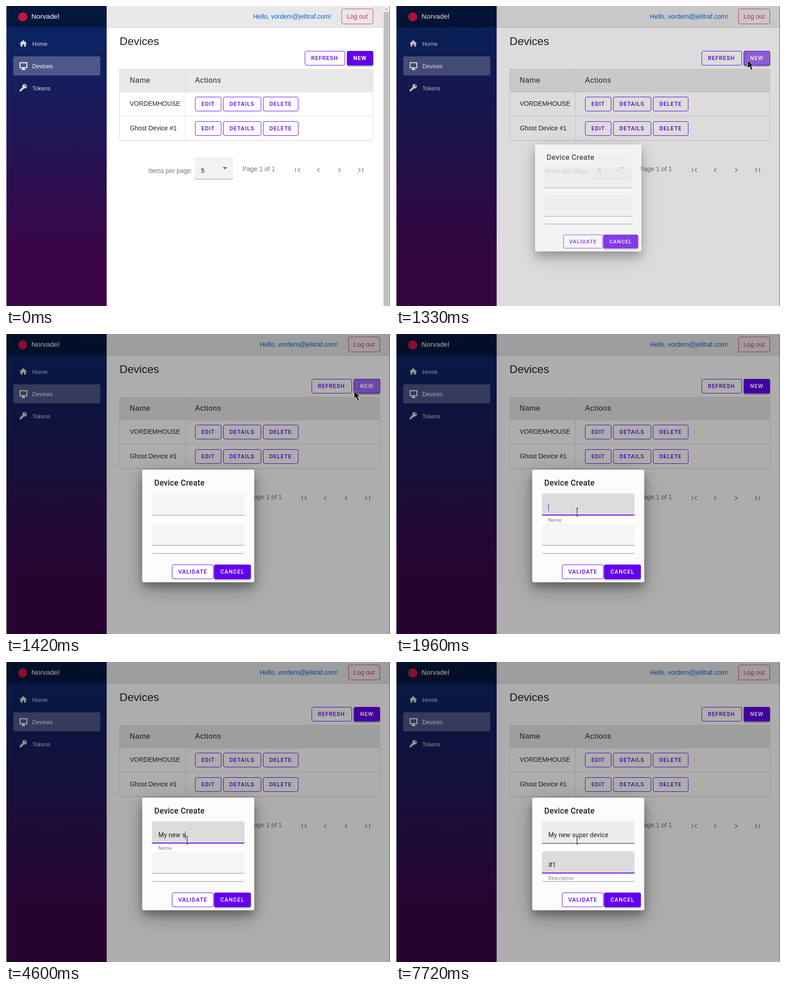
Write an HTML page that moves like this. It is 847x661 px and loops after 8000 ms.

```html
<!DOCTYPE html>
<html lang="en">
<head>
<meta charset="utf-8">
<title>Device Create</title>
<style>
  html, body { margin: 0; width: 100%; height: 100%; overflow: hidden; background: #fff; }
  svg { display: block; }
  text { font-family: "Liberation Sans", Arial, sans-serif; font-size: 14px; white-space: pre; }
  .nav { font-size: 12.6px; fill: #d7d7d7; }
  .th { font-size: 16px; letter-spacing: .75px; }
  .btn { font: 500 12.25px Roboto, sans-serif; letter-spacing: 1.09px; }
  .title { font: 500 17.5px Roboto, sans-serif; letter-spacing: .22px; }
  .input { font: 14px Roboto, sans-serif; letter-spacing: .13px; }
  .helper { font: 10.5px Roboto, sans-serif; letter-spacing: .35px; }
  .raised { filter: drop-shadow(0 2px 1.5px #0006); }
  #panel { filter: drop-shadow(0 11px 9px #0004) drop-shadow(0 12px 20px #0004); }
</style>
</head>
<body>
<svg id="stage" width="847" height="661" viewBox="0 0 847 661"></svg>
<script>
const PURPLE = '#6200ee', DARK = '#212121', GREY = '#747474';
const LOOP = 8000, STEP = 30;

const text = (x, y, label, fill = DARK, cls = '', attrs = '') =>
  `<text x="${x}" y="${y}" fill="${fill}" class="${cls}" ${attrs}>${label}</text>`;
const rect = (x, y, w, h, fill, attrs = '') =>
  `<rect x="${x}" y="${y}" width="${w}" height="${h}" fill="${fill}" ${attrs}/>`;
const path = (d, fill, attrs = '') => `<path d="${d}" fill="${fill}" ${attrs}/>`;
const line = (d, color, width = 1) => path(d, 'none', `stroke="${color}" stroke-width="${width}"`);

function button(x, y, w, label, raised) {
  const box = raised
    ? rect(x, y, w, 32, PURPLE, 'rx="3.5" class="raised"')
    : rect(x + .5, y + .5, w - 1, 31, '#fff', `rx="3.5" stroke="${PURPLE}"`);
  return box + text(x + 14, y + 20, label, raised ? '#fff' : PURPLE, 'btn');
}

const rowButtons = y =>
  button(417, y, 58, 'EDIT') + button(479, y, 84, 'DETAILS') + button(567, y, 78, 'DELETE');

// A text field with its hover/focus shade, underlines, value and helper text.
const field = (id, y, helper) => `<g id="${id}">
  ${path(`M322 ${y + 49}V${y + 4}q0-4 4-4H522q4 0 4 4V${y + 49}Z`, '#f5f5f5')}
  ${path(`M322 ${y + 49}V${y + 4}q0-4 4-4H522q4 0 4 4V${y + 49}Z`, '#000', 'class="shade"')}
  ${rect(322, y + 48, 204, 1, '#000', 'class="line"')}
  ${rect(322, y + 47, 204, 2, PURPLE, 'class="focus"')}
  ${text(336, y + 35, '', DARK, 'input')}
  ${text(336, y + 63, helper, GREY, 'helper')}</g>`;

const sidebar = `
  ${rect(1, 0, 221, 661, 'url(#night)')}
  ${rect(1, 0, 221, 47, '#000', 'opacity=".4"')}
  <circle cx="37" cy="24" r="10" fill="#c81440"/>
  ${text(56, 28, 'Norvadel', '#fff', '', 'style="font-size:15.4px"')}
  ${rect(16, 111, 192, 42, '#fff', 'rx="3.5" opacity=".25"')}
  ${path('M38 75l8.5 8H44v6.5h-4V85h-4v4.5h-4V83h-2.500Z', '#d7d7d7')}
  ${text(58, 87.5, 'Home', '', 'nav')}
  ${path('M30 124H47V137H40.500V139H43V141H34V139H36.500V137H30ZM32 126V135H45V126Z', '#fff', 'fill-rule="evenodd"')}
  ${text(58, 136.5, 'Devices', '', 'nav', 'style="fill:#fff"')}
  <circle cx="41" cy="177" r="5" fill="#d7d7d7"/><circle cx="42.500" cy="175.500" r="1.500" fill="#1a2a66"/>
  ${path('M37 178L30 185V188H34V186H36V184H38L40 181Z', '#d7d7d7')}
  ${text(58, 186, 'Tokens', '', 'nav')}`;

const table = `
  ${rect(250, 139, 575, 50, '#e9e9e9')}
  ${line('M250.500 297V139M395.500 139V297M250 139.500H825M250 189.500H825M250 242.500H825', '#dcdcdc')}
  ${line('M250 296.500H825', '#cfcfcf')}
  ${text(273, 169, 'Name', DARK, 'th')}${text(417, 169, 'Actions', DARK, 'th')}
  ${text(273, 220, 'VORDEMHOUSE')}${text(273, 274, 'Ghost Device #1')}
  ${rowButtons(200)}${rowButtons(254)}`;

// Everything aligned to the right edge, which moves when the scrollbar goes.
const rightSide = `<g id="right">
  ${text(545, 27.5, 'Hello, vordem@jelitraf.com!', '#0366d6')}
  ${rect(740.5, 6.5, 69, 33, 'none', 'rx="3.5" stroke="#dc3545"')}
  ${text(751.5, 27.5, 'Log out', '#dc3545')}
  ${button(659, 99, 89, 'REFRESH')}${button(752, 99, 58, 'NEW', true)}
  ${rect(753, 100, 56, 30, '#fff', 'rx="3" id="ripple"')}${text(766, 119, 'NEW', '#fff', 'btn')}
  ${rect(810, 138, 40, 160, '#fff')}${line('M809.500 139V297', '#dcdcdc')}
  ${text(314, 368, 'Items per page:', GREY)}
  ${path('M416 382V337q0-4 4-4H497q4 0 4 4V382Z', '#f3f3f3')}${rect(416, 381, 85, 1, '#8c8c8c')}
  ${text(430, 367.5, '5')}${path('M478 355H488L483 360Z', '#666')}
  ${text(522, 364, 'Page 1 of 1', GREY)}
  ${line('M638.500 356.500v10M648.500 357l-4.500 4.500l4.500 4.500M691.500 357l-4.500 4.500l4.500 4.500M733 357l4.500 4.500l-4.500 4.500M777 357l4.500 4.500l-4.500 4.500M787 356.500v10', '#858585', 1.6)}
  </g>`;

const dialog = `<g id="dialog">
  ${rect(300.5, 299, 247, 248, '#fcfcfc', 'rx="3.5" id="panel"')}
  ${text(327, 334, 'Device Create', DARK, 'title')}
  ${rect(322, 351, 204, 132, '#fff', 'rx="4" style="filter:drop-shadow(0 1px .6px #0007)"')}
  ${field('name', 351, 'Name')}${field('description', 417, 'Description')}
  ${button(366, 508, 92, 'VALIDATE')}${button(459, 508, 81, 'CANCEL', true)}
  ${rect(0, 0, 1, 17, PURPLE, 'id="caret"')}</g>`;

document.getElementById('stage').innerHTML = `
  <defs><linearGradient id="night" gradientUnits="userSpaceOnUse" x1="0" y1="0" x2="0" y2="540">
    <stop stop-color="#052767"/><stop offset="1" stop-color="#3a0647"/></linearGradient></defs>
  ${rect(0, 0, 847, 661, '#fff')}
  ${rect(222, 0, 624, 47, '#e8e8e8')}${rect(222, 47, 624, 1, '#d6d5d5')}
  ${sidebar}
  ${text(250.5, 86, 'Devices', DARK, '', 'style="font-size:24.5px"')}
  ${table}${rightSide}
  <g id="scrollbar">${rect(832, 0, 14, 661, '#f1f1f1')}${rect(833, 13, 12, 648, '#c1c1c1')}
    ${path('M835.500 8.500L839 4.500L842.500 8.500Z', '#a3a3a3')}</g>
  ${rect(1, 0, 845, 661, '#000', 'id="scrim"')}
  ${rect(846, 0, 1, 661, '#5a5a5a')}
  ${dialog}
  <g id="arrow">${path('M0 0V17L4 13.300L7.300 21L10.500 19.600L7.200 12.300H12.500Z', '#000', 'stroke="#fff" stroke-width=".8"')}</g>
  <g id="beam">${line('M-3 -8.500h2.500l.5 .5l.5-.5H3M0-8V8M-3 8.500h2.500l.5-.5l.5 .5H3', '#fff', 2.4)}
    ${line('M-3 -8.500h2.500l.5 .5l.5-.5H3M0-8V8M-3 8.500h2.500l.5-.5l.5 .5H3', '#000', 1.2)}</g>`;

const $ = id => document.getElementById(id);
const part = (id, cls) => $(id).querySelector('.' + cls);
const set = (el, name, value) => el.setAttribute(name, value);
const ramp = (t, from, to) => Math.min(1, Math.max(0, (t - from) / (to - from)));
const smooth = p => p * p * (3 - 2 * p);
const between = (t, from, to) => t >= from && t < to;

const nameKeys = [2440, 2800, 3070, 3250, 3580, 3700, 3910, 4600, 4720, 4840,
  5020, 5110, 5260, 5410, 5530, 5620, 5800, 5890, 6040];
const typed = (value, keys, t) => value.slice(0, keys.filter(k => k <= t).length);

function drawField(id, value, focusIn, focusOut, hover) {
  const focus = focusIn * (1 - focusOut), width = 204 * smooth(focusIn);
  const underline = part(id, 'focus');
  part(id, 'input').textContent = value;
  set(part(id, 'shade'), 'opacity', .1 * focus + .037 * hover * (1 - focus));
  set(part(id, 'line'), 'opacity', .42 + .45 * hover);
  set(underline, 'x', 424 - width / 2);
  set(underline, 'width', width);
  set(underline, 'opacity', 1 - focusOut);
  set(part(id, 'helper'), 'opacity', focus);
}

function draw(t) {
  // Page: scroll lock, button ripple, scrim
  const locked = t >= 1270;
  set($('right'), 'transform', `translate(${locked ? 15 : 0})`);
  set($('scrollbar'), 'opacity', locked ? 0 : 1);
  set($('ripple'), 'opacity',
    (.08 * ramp(t, 570, 850) + .34 * ramp(t, 1120, 1240)) * (1 - ramp(t, 1420, 1630)));
  set($('scrim'), 'opacity', .32 * ramp(t, 1275, 1405));

  // Dialog
  const scale = 1 - .2 * (1 - ramp(t, 1275, 1425)) ** 3;
  set($('dialog'), 'opacity', ramp(t, 1275, 1350));
  set($('dialog'), 'transform', `translate(424 423) scale(${scale}) translate(-424 -423)`);
  const moved = ramp(t, 6460, 6670);
  drawField('name', typed('My new super device', nameKeys, t), ramp(t, 1750, 1930), moved, ramp(t, 1690, 1750));
  drawField('description', typed('#1', [7000, 7540], t), moved, 0, 0);

  const second = t >= 6130;
  const input = part(second ? 'description' : 'name', 'input');
  const caretOn = between(t, 1960, 4090) || between(t, 4600, 6490) || between(t, 7030, 7720);
  const length = input.textContent ? input.getComputedTextLength() : 0;
  set($('caret'), 'x', 336 + Math.floor(length));
  set($('caret'), 'y', second ? 439 : 373);
  set($('caret'), 'opacity', caretOn ? 1 : 0);

  // Pointer: in from the right edge to NEW, then down to the first field
  const a = smooth(ramp(t, 370, 640)), b = smooth(ramp(t, 1390, 1740));
  const x = 845 - 69 * a - 377 * b, y = 69 + 51 * a + 272 * b;
  const overField = b > 0 && x < 526 && y > 351;
  set($('arrow'), 'transform', `translate(${x} ${y})`);
  set($('arrow'), 'opacity', t >= 100 && !overField ? 1 : 0);
  set($('beam'), 'transform', `translate(${x + .5} ${y + .5})`);
  set($('beam'), 'opacity', overField ? 1 : 0);
}

// The picture advances in 30 ms steps, like a screen recording.
const start = performance.now();
function tick() {
  const t = (performance.now() - start) % LOOP;
  draw(Math.max(0, Math.floor((t - 10) / STEP) * STEP + 10));
  requestAnimationFrame(tick);
}
tick();
</script>
</body>
</html>
```
